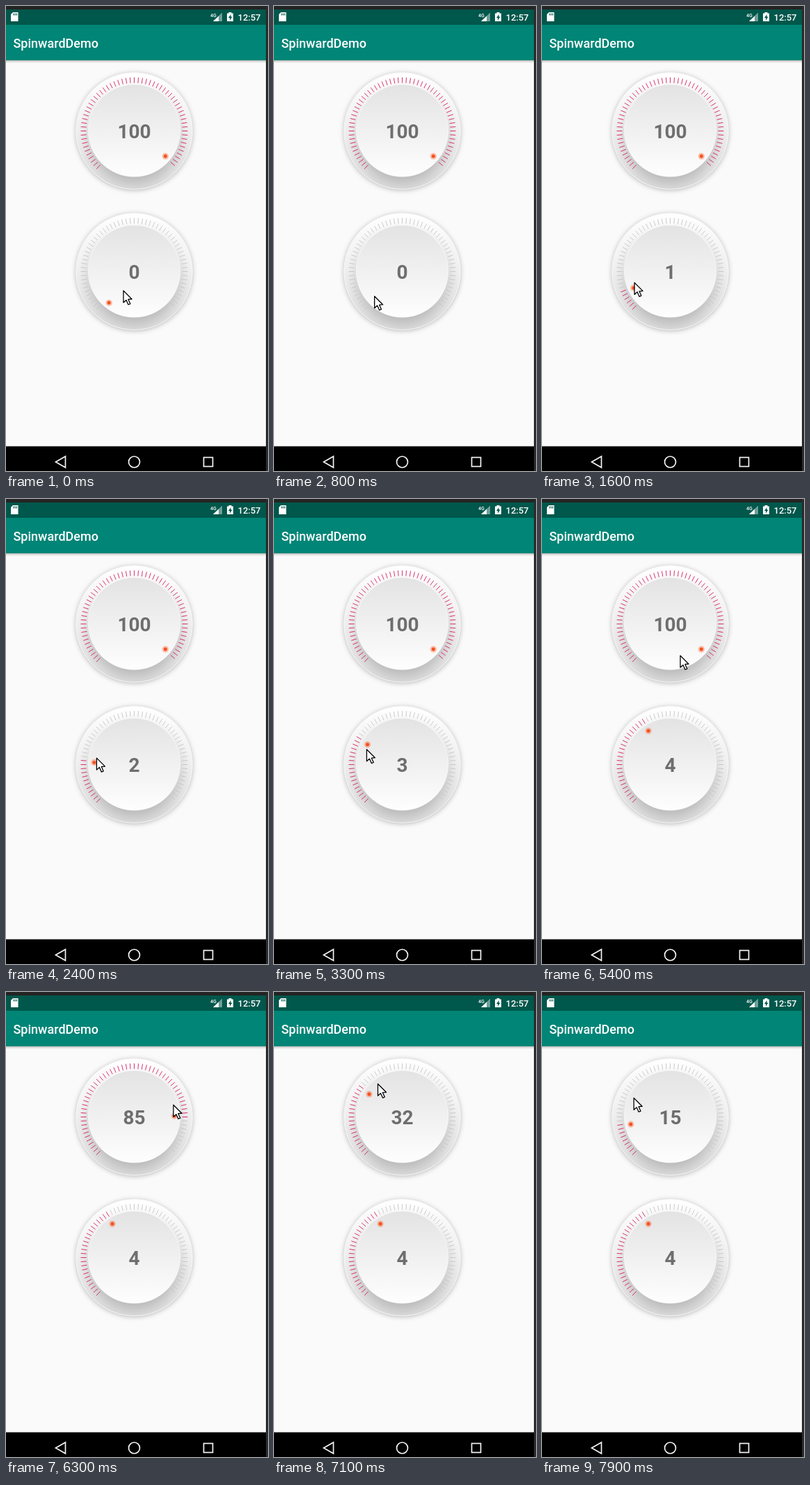
An HTML page with a canvas that plays this animation: 377x668 px, repeating every 8000 ms.

```html
<!DOCTYPE html>
<html lang="en">
<head>
<meta charset="utf-8">
<title>Dial demo</title>
<style>
  html, body { margin: 0; width: 100%; height: 100%; overflow: hidden; background: #fafafa; }
  canvas { display: block; }
</style>
</head>
<body>
<canvas width="377" height="668"></canvas>
<script>
const c = document.querySelector('canvas').getContext('2d');
const LOOP = 8000, STEP = 100, CX = 184.5, TOP = 179.5, BOTTOM = 381.5;
const RAD = Math.PI / 180, TICKS = 60, SWEEP = 270;

// Free pointer moves: [time, x, y]
const GLIDE = [[0, 169, 409], [500, 149, 421], [4900, 152, 334], [5400, 199, 225], [5800, 223, 223]];
// Drag around the lower dial with short rests: [time, angle]
const LOWER_DRAG = [
  [600, 132], [1600, 161], [2400, 187], [2600, 187], [3300, 200],
  [3400, 200], [4000, 217], [4200, 217], [4600, 233]
];
// Drag around the upper dial, whose value lags: [time, angle, value]
const UPPER_DRAG = [
  [5800, 48.5, 100], [6300, -17, 85], [6700, -58, 57], [7600, -212, 0], [7900, -152.5, 15]
];

function sample(keys, t) {
  const i = keys.findIndex(k => k[0] > t);
  if (i === 0) return keys[0].slice(1);
  if (i < 0) return keys[keys.length - 1].slice(1);
  const a = keys[i - 1], b = keys[i], p = (t - a[0]) / (b[0] - a[0]);
  return a.slice(1).map((v, n) => v + (b[n + 1] - v) * p);
}

function orbit(x, y, r, deg) {
  return [x + r * Math.cos(deg * RAD), y + r * Math.sin(deg * RAD)];
}

function rect(x, y, w, h, fill) {
  c.fillStyle = fill;
  c.fillRect(x, y, w, h);
}

function circle(x, y, r) {
  c.beginPath();
  c.arc(x, y, r, 0, 2 * Math.PI);
}

function disc(x, y, r, fill) {
  circle(x, y, r);
  c.fillStyle = fill;
  c.fill();
}

function poly(points, fill, stroke, width) {
  c.beginPath();
  points.forEach(p => c.lineTo(...p));
  c.closePath();
  if (fill) { c.fillStyle = fill; c.fill(); }
  if (stroke) { c.strokeStyle = stroke; c.lineWidth = width; c.stroke(); }
}

function text(s, x, y, font, fill, align = 'left') {
  c.font = font + ' Roboto, sans-serif';
  c.textAlign = align;
  c.fillStyle = fill;
  c.fillText(s, x, y);
}

function shade(y0, y1, ...colors) {
  const g = c.createLinearGradient(0, y0, 0, y1);
  colors.forEach((color, i) => g.addColorStop(i / (colors.length - 1), color));
  return g;
}

function shadow(alpha, blur, dy) {
  c.shadowColor = `rgba(0,0,0,${alpha})`;
  c.shadowBlur = blur;
  c.shadowOffsetY = dy;
}

function dial(cy, part, label) {
  c.save();
  shadow(.28, 7, 1);
  disc(CX, cy, 84, shade(cy - 84, cy + 84, '#fff', '#f0f0f0', '#dedede'));
  circle(CX, cy, 84);
  c.clip();
  shadow(.19, 18, 10);
  disc(CX, cy - .5, 66, '#eee');
  c.restore();

  circle(CX, cy, 83.7);
  c.strokeStyle = '#f7f7f7';
  c.lineWidth = 1;
  c.stroke();
  disc(CX, cy - .5, 66.5, '#f8f8f8');
  disc(CX, cy - .5, 65.7, shade(cy - 66, cy + 66, '#e3e3e3', '#fefefe'));

  const lit = Math.round(part * TICKS);
  c.lineWidth = .9;
  for (let i = 0; i < TICKS; i++) {
    const deg = 135 + i * SWEEP / TICKS;
    c.beginPath();
    c.moveTo(...orbit(CX, cy, 69, deg));
    c.lineTo(...orbit(CX, cy, 77, deg));
    c.strokeStyle = i < lit ? '#d81b60' : '#c6c6c6';
    c.stroke();
  }

  const [x, y] = orbit(CX, cy, 57.7, 129 + SWEEP * part);
  disc(x, y, 4.7, 'rgba(255,87,34,.35)');
  disc(x, y, 2.5, '#f4511e');
  text(label, CX, cy + 10.5, 'bold 28px', '#6e6e6e', 'center');
}

function statusBar() {
  rect(0, 5, 374, 22, '#00574b');
  poly([[10, 9], [17.5, 9], [17.5, 22], [7, 22], [7, 12]], '#fff');
  for (let i = 0; i < 3; i++) rect(10.5 + i * 2.2, 10.5, 1.1, 3, '#00574b');
  text('4G', 294, 16, '500 7px', '#fff');
  poly([[311, 9.5], [311, 22], [298, 22]], '#6f9f98');
  poly([[306, 14.4], [306, 22], [298, 22]], '#fff');
  rect(320.5, 9, 4, 2, '#fff');
  rect(318, 10.5, 9, 11.5, '#fff');
  poly([[323.5, 12], [320, 17], [322, 17], [322, 20.5], [325.5, 15.5], [323.5, 15.5]], '#00574b');
  text('12:57', 333.5, 21, '500 13px', '#fff');
}

function navBar() {
  rect(0, 632.5, 374, 36, '#000');
  poly([[71.5, 655], [85.5, 647], [85.5, 663]], null, '#f4f4f4', 1.7);
  circle(CX, 655, 8);
  c.stroke();
  c.strokeRect(284.5, 648.5, 13, 13);
}

function pointer(x, y) {
  c.save();
  c.translate(x, y);
  c.lineJoin = 'round';
  poly([[0, 0], [0, 17], [4, 13.4], [7, 20], [9.8, 18.8], [6.9, 12.4], [12, 12]], '#fff', '#000', 1.3);
  c.restore();
}

function draw(now) {
  const t = Math.floor(now % LOOP / STEP) * STEP;
  const [lowerAngle] = sample(LOWER_DRAG, t);
  const [upperAngle, upper] = sample(UPPER_DRAG, t);
  const lower = Math.round((lowerAngle - 131.5) / 27);

  rect(0, 0, 377, 668, '#fafafa');
  rect(0, 78, 374, 4, shade(78, 82, 'rgba(0,0,0,.24)', 'rgba(0,0,0,0)'));
  rect(0, 27, 374, 51, '#008577');
  text('SpinwardDemo', 10.5, 60, '500 18px', '#fff');
  statusBar();
  dial(TOP, upper / 100, Math.round(upper));
  dial(BOTTOM, lower / 10, lower);
  navBar();
  rect(0, 0, 377, 5, '#242424');
  rect(374, 0, 3, 668, '#2a2a2a');

  if (t > 5800) pointer(...orbit(CX, TOP, 59, upperAngle));
  else if (t > 500 && t < 4900) pointer(...orbit(186.5, 379, 56.5, lowerAngle));
  else pointer(...sample(GLIDE, t));
}

const start = performance.now();
function tick() {
  draw(performance.now() - start);
  requestAnimationFrame(tick);
}
tick();
</script>
</body>
</html>
```
